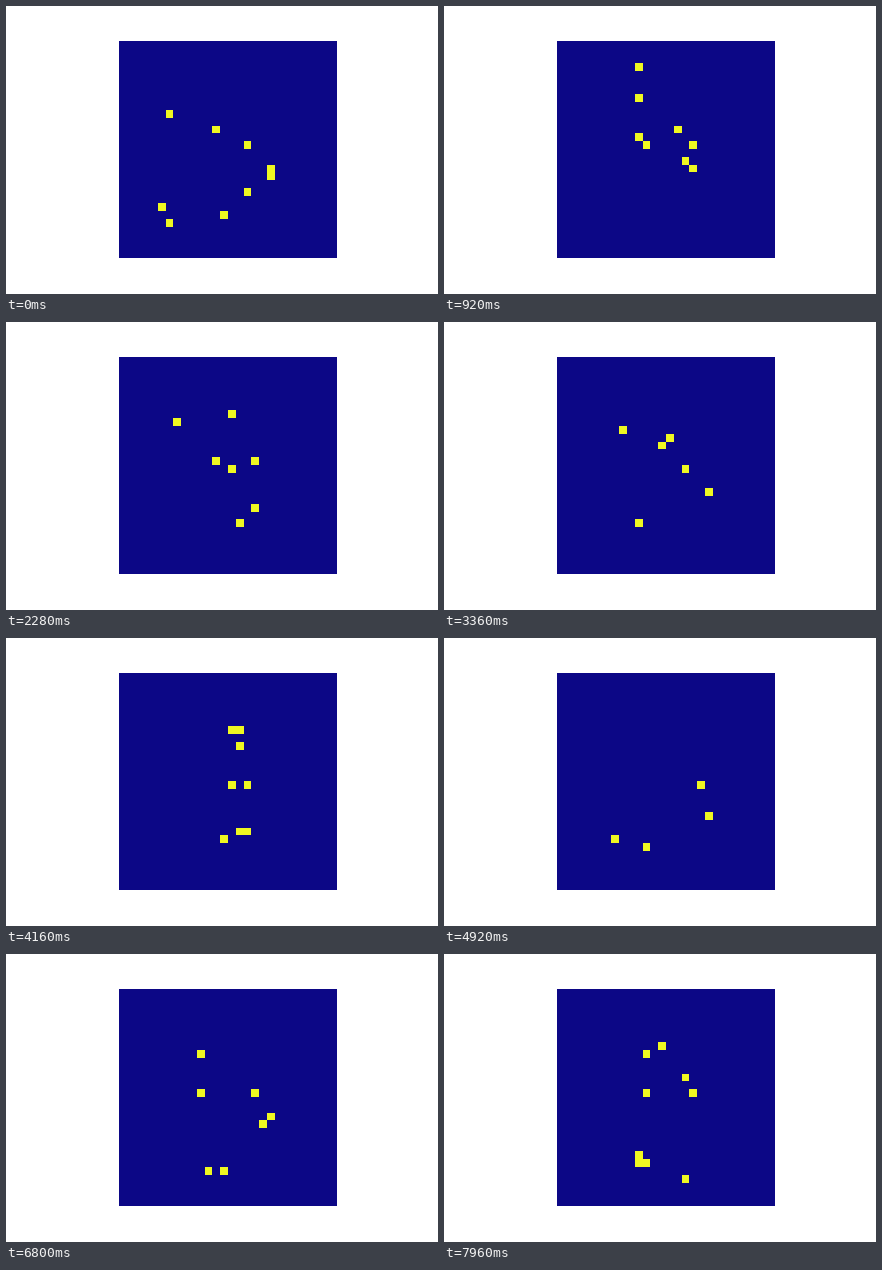
These frames come from a looping animation (432x288 px, 8000 ms). A matplotlib script:

```python
import matplotlib.pyplot as plt
import numpy as np
from matplotlib.animation import FuncAnimation

SIZE, STEPS, INTERVAL = 28, 200, 40
DIGIT_SPIKES = 7.0   # mean spikes per step along the stroke
NOISE = 0.0008       # spike chance of every cell
HALF_WIDTH = 1.9     # the stroke fades out over its last cell


def arc(center, radii, start, stop):
    """Points along an ellipse, angles in degrees, y pointing down."""
    a = np.radians(np.linspace(start, stop, 60))
    return np.column_stack([center[0] + radii[0] * np.cos(a),
                            center[1] + radii[1] * np.sin(a)])


def digit_ink():
    """Ink of a handwritten 3: two bowls and a flat tail."""
    upper = arc((11.4, 9.7), (4.1, 2.6), 200, 450)
    lower = arc((11.5, 17.4), (6.8, 4.7), -90, 90)
    tail = np.linspace((11.5, 22.1), (4.5, 22), 30)
    px, py = np.vstack([upper, lower, tail]).T
    y, x = np.mgrid[:SIZE, :SIZE]
    gap = np.hypot(x[..., None] - px, y[..., None] - py).min(axis=-1)
    return np.clip(HALF_WIDTH - gap, 0, 1)


ink = digit_ink()
rate = NOISE + DIGIT_SPIKES * ink / ink.sum()
rng = np.random.default_rng(3)
spikes = (rng.random((STEPS, SIZE, SIZE)) < rate).astype(float)

fig, ax = plt.subplots(figsize=(6, 4), dpi=72, facecolor="white")
fig.subplots_adjust(left=0.125, right=0.9, bottom=0.125, top=0.88)
ax.axis("off")
image = ax.imshow(spikes[0], cmap="plasma", vmin=0, vmax=1,
                  interpolation="nearest")


def update(step):
    image.set_data(spikes[step])
    return [image]


anim = FuncAnimation(fig, update, frames=STEPS, interval=INTERVAL, repeat=True,
                     repeat_delay=0)
plt.show()
```
